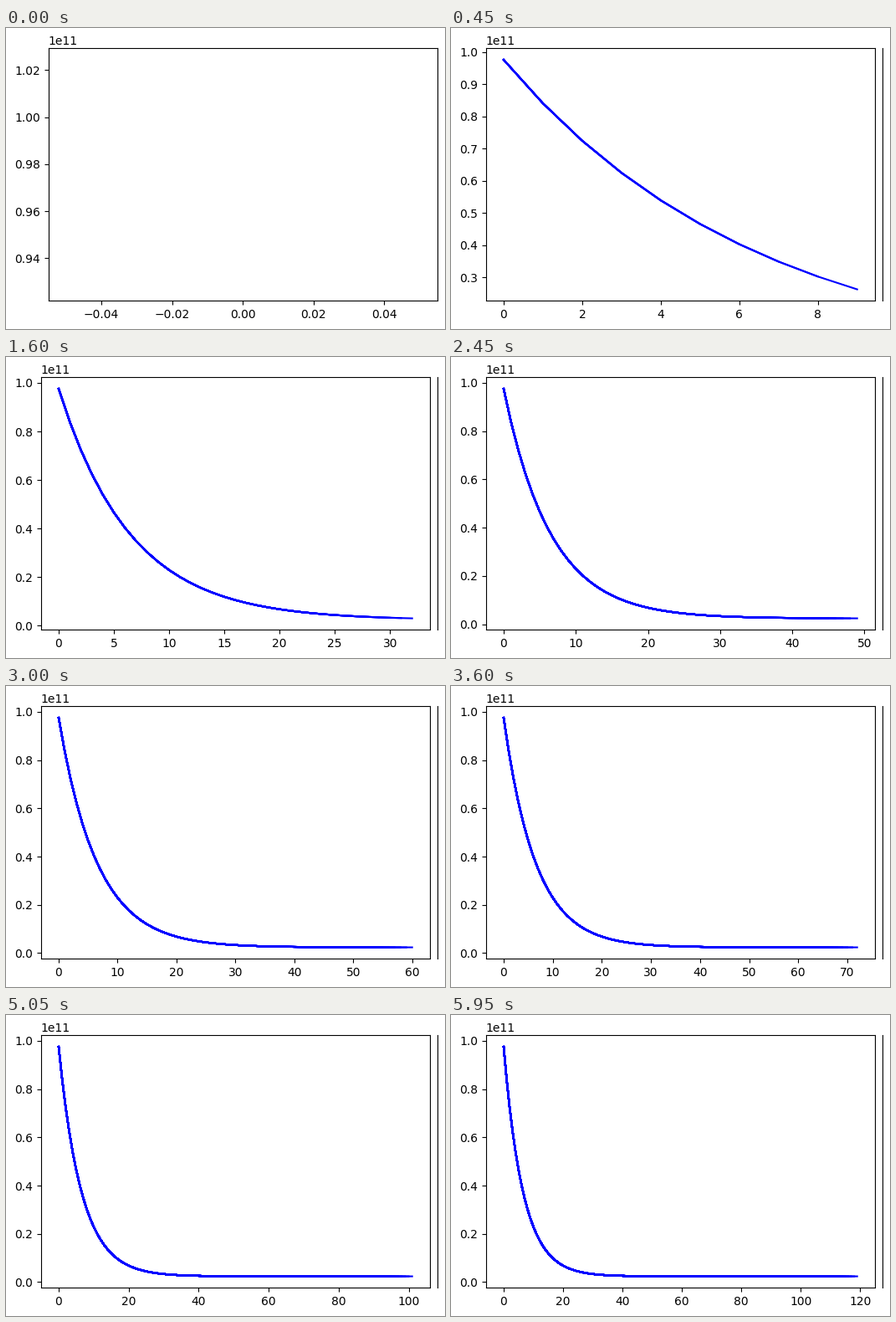
Animation of 525 by 360 pixels, one loop 6 s. Source, as a matplotlib script:

```python
import numpy as np
import matplotlib.pyplot as plt
from matplotlib.animation import FuncAnimation
from matplotlib.lines import Line2D

W, H, DPI = 525, 360, 100
FRAMES, INTERVAL = 120, 50
AX_W, AX_H, BOTTOM = 465, 302, 33.7
START, FLOOR, RATE = 0.9756e11, 0.0235e11, 0.858

plt.rcParams["font.family"] = "DejaVu Sans"
plt.rcParams["font.size"] = 10

steps = np.arange(FRAMES)
cost = FLOOR + (START - FLOOR) * RATE ** steps

fig = plt.figure(figsize=(W / DPI, H / DPI), dpi=DPI, facecolor="white")
ax = fig.add_axes([0, 0, 1, 1])

# Every step adds one more, slightly longer curve over the earlier ones.
curves = [ax.plot(steps[:n + 1], cost[:n + 1], color="blue", lw=1.5)[0]
          for n in steps]

# Edge of the wider first plots that stays on the right.
edge = Line2D([515.7, 515.7], [BOTTOM, BOTTOM + AX_H], color="black", lw=0.8,
              solid_capstyle="projecting", transform=None)
fig.add_artist(edge)


def padded(lo, hi):
    pad = 0.05 * (hi - lo)
    return lo - pad, hi + pad


def draw(n):
    # Two-decimal tick labels need more room on the left.
    wide = n < 4
    left = 50.7 if wide else 41.85
    ax.set_position([left / W, BOTTOM / H, AX_W / W, AX_H / H])
    edge.set_visible(not wide)
    if n == 0:
        ax.set_xlim(padded(-0.05, 0.05))
        ax.set_ylim(padded(0.95 * START, 1.05 * START))
    else:
        ax.set_xlim(padded(0, n))
        ax.set_ylim(padded(cost[n], START))
    for i, curve in enumerate(curves):
        curve.set_visible(0 < i <= n)
    return curves


anim = FuncAnimation(fig, draw, frames=FRAMES, interval=INTERVAL,
                     init_func=lambda: draw(0), repeat=True, repeat_delay=0,
                     blit=False)
plt.show()
```
